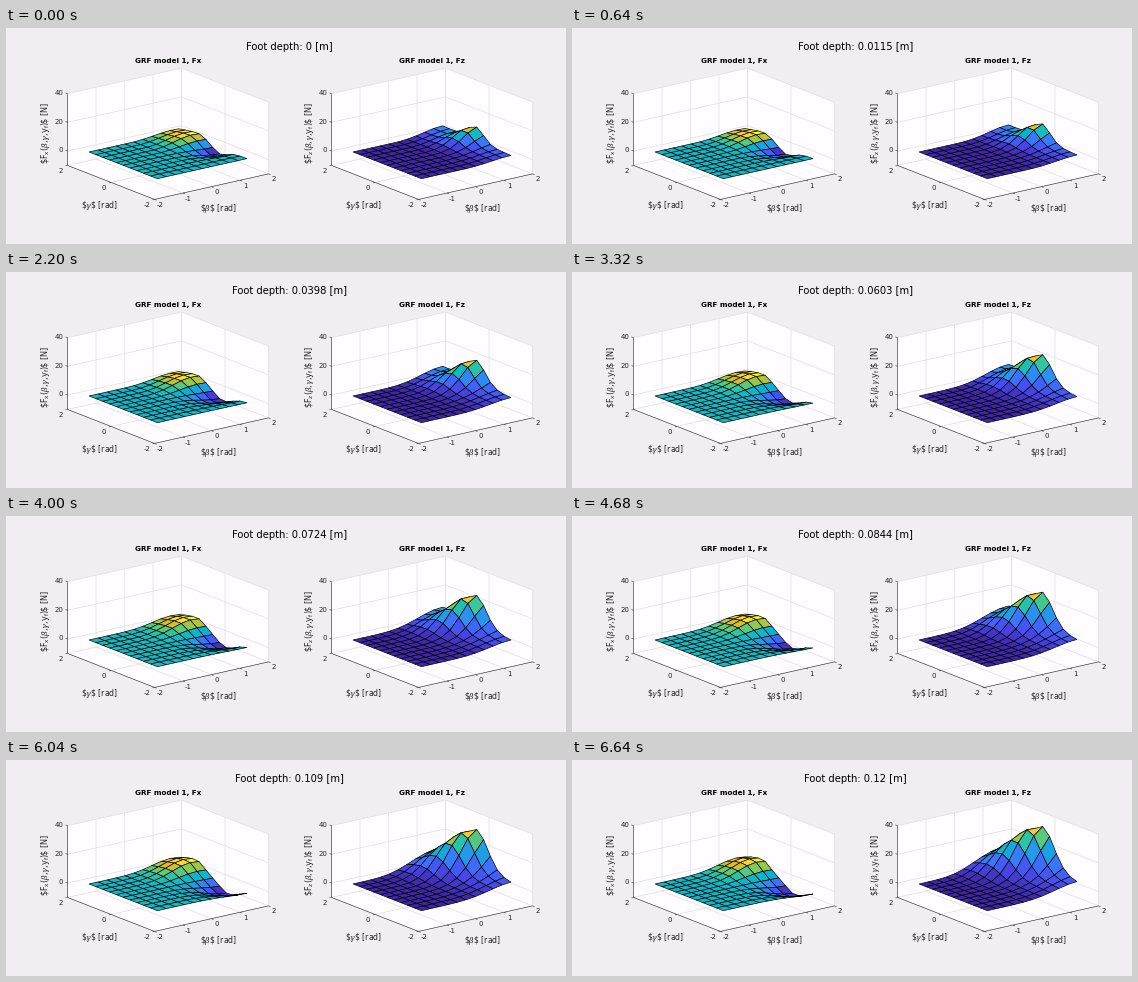
Write a matplotlib script that moves like this. It is 560 px wide and 216 px high and loops after 6680 ms.

```python
import numpy as np
import matplotlib.pyplot as plt
from matplotlib.animation import FuncAnimation
from matplotlib.collections import LineCollection, PolyCollection
from matplotlib.colors import LinearSegmentedColormap

W, H, DPI = 560, 216, 100
FRAMES, STEP_MS = 167, 40
SAMPLES, MAX_DEPTH = 200, 0.12
INK = "#262626"

plt.rcParams.update({
    "font.family": "DejaVu Sans",
    "mathtext.fontset": "custom",
    "mathtext.rm": "DejaVu Sans",
    "mathtext.it": "DejaVu Serif:italic",
})

parula = LinearSegmentedColormap.from_list("parula", [
    (.2422, .1504, .6603), (.2803, .2782, .9221), (.2440, .4358, .9988),
    (.1540, .5902, .9218), (.0297, .7082, .8163), (.1938, .7758, .6251),
    (.5044, .7993, .3480), (.8634, .7406, .1596), (.9892, .8136, .1885),
    (.9769, .9839, .0805)])

fig = plt.figure(figsize=(W / DPI, H / DPI), dpi=DPI, facecolor="#f0eef0")
ax = fig.add_axes([0, 0, 1, 1])
ax.set_xlim(-.5, W - .5)
ax.set_ylim(H - .5, -.5)
ax.axis("off")


def px(size):
    """Pixels to points."""
    return size * 72 / DPI


def label(x, y, s, size=7.0, **kw):
    kw = {"ha": "center", "va": "center", "color": INK, **kw}
    return ax.text(x, y, s, fontsize=px(size), **kw)


def project(b, g, z, x0=0):
    """Orthographic view of (beta, gamma, force) in stage pixels."""
    x = x0 + 161.5 + 28.5 * b - 21.75 * g
    y = 126.8 - 6.38 * b - 8.5 * g - 1.435 * z
    return np.stack([x, y], axis=-1)


def bell(x, mid, left, right):
    return np.exp(-((x - mid) / np.where(x < mid, left, right)) ** 2)


axis = np.linspace(-np.pi / 2, np.pi / 2, 11)
B, G = np.meshgrid(axis, axis)


def force_x(d):
    t = d / MAX_DEPTH
    push = 35 * bell(G, .62 + .15 * t, .43 + .07 * t, 1.15)
    pull = 30 * bell(G, -.35 - .4 * t, .45 + .3 * t, .42 + .13 * t)
    sunk = np.maximum(d + .14 * np.sin(B), 0)
    return sunk * (push * bell(B, 1.2, 1.05, 1.05)
                   - pull * bell(B, np.pi / 2, 1.15, 1))


def force_z(d):
    t = d / MAX_DEPTH
    sunk = np.maximum(d + .068 * np.sin(B), 0)
    # the ridge bends towards higher gamma as beta falls
    ridge = .05 * (1 - t) + (.3 + .4 * t) * (np.pi / 2 - B)
    peak = .74 * bell(G, ridge, .5 + .22 * t, .5 + .33 * t)
    peak = peak * bell(B, np.pi / 2, .77 + .43 * t, 1)
    base = (.25 + .05 * G) * bell(B, np.pi / 2, 1.2, 1)
    return 190 * sunk * (peak + base)


def draw_box(x0):
    def p(b, g, z):
        return project(b, g, z, x0)

    left, front, right, back = (-2, 2), (-2, -2), (2, -2), (2, 2)
    faces = [[p(*left, -10), p(*front, -10), p(*right, -10), p(*back, -10)],
             [p(*left, -10), p(*left, 40), p(*back, 40), p(*back, -10)],
             [p(*back, -10), p(*back, 40), p(*right, 40), p(*right, -10)]]
    ax.add_collection(PolyCollection(faces, facecolors="#fffdff",
                                     edgecolors="none", zorder=1))

    grid = [[p(b, -2, -10), p(b, 2, -10), p(b, 2, 40)] for b in range(-2, 3)]
    grid += [[p(-2, g, -10), p(2, g, -10), p(2, g, 40)] for g in (-2, 0, 2)]
    grid += [[p(*left, z), p(*back, z), p(*right, z)] for z in (0, 20, 40)]
    ax.add_collection(LineCollection(grid, colors="#e1dfe1",
                                     linewidths=px(.75), zorder=2))

    lines = [[p(*left, 40), p(*left, -10), p(*front, -10), p(*right, -10)]]
    for b in range(-2, 3):
        a = p(b, -2, -10)
        lines.append([a, a + (2, .8)])
        label(a[0] + 5.5, a[1] + 5.6, str(b))
    for g in (-2, 0, 2):
        a = p(-2, g, -10)
        lines.append([a, a + (-2, .5)])
        label(a[0] - 7, a[1] + 5.2, str(g))
    for z in (0, 20, 40):
        a = p(*left, z)
        lines.append([a, a + (-2, -.8)])
        label(a[0] - 4.3, a[1] - .7, str(z), ha="right")
    ax.add_collection(LineCollection(lines, colors=INK,
                                     linewidths=px(.55), zorder=3))


class Surface:
    def __init__(self, x0, name, force):
        self.x0, self.force = x0, force
        draw_box(x0)
        label(x0 + 161.5, 35, f"GRF model 1, F{name}", 7.3, va="baseline",
              color="black", weight="bold")
        label(x0 + 38.5, 104,
              rf"\$$\mathrm{{F}}_\mathrm{{{name}}}$($\beta$,$\gamma$,"
              r"$\mathrm{y}_\mathrm{f}$)\$ [N]", 8.1, rotation=90)
        label(x0 + 93.5, 177.5, r"\$$\gamma$\$ [rad]", 7.8)
        label(x0 + 212, 180, r"\$$\beta$\$ [rad]", 7.8)
        self.mesh = PolyCollection([], edgecolors="black",
                                   linewidths=px(.65), zorder=4)
        ax.add_collection(self.mesh)

    def show(self, d):
        f = self.force(d)
        v = project(B, G, f, self.x0)
        quads = np.stack([v[:-1, :-1], v[:-1, 1:], v[1:, 1:], v[1:, :-1]],
                         axis=2)
        # far cells first
        self.mesh.set_verts(quads[::-1, ::-1].reshape(-1, 4, 2))
        shade = (f - f.min()) / np.ptp(f)
        self.mesh.set_facecolors(parula(shade[:-1, :-1][::-1, ::-1].ravel()))


surfaces = [Surface(0, "x", force_x), Surface(264, "z", force_z)]
heading = label(283, 22, "", 10, va="baseline", color="black")


def update(i):
    step = min(round(1.2 * i), SAMPLES - 1)
    depth = MAX_DEPTH * step / (SAMPLES - 1)
    heading.set_text(f"Foot depth: {depth:.3g} [m]")
    for s in surfaces:
        s.show(depth)
    return [heading, *(s.mesh for s in surfaces)]


anim = FuncAnimation(fig, update, frames=FRAMES, interval=STEP_MS,
                     init_func=lambda: update(0), repeat=True, repeat_delay=0)
plt.show()
```
